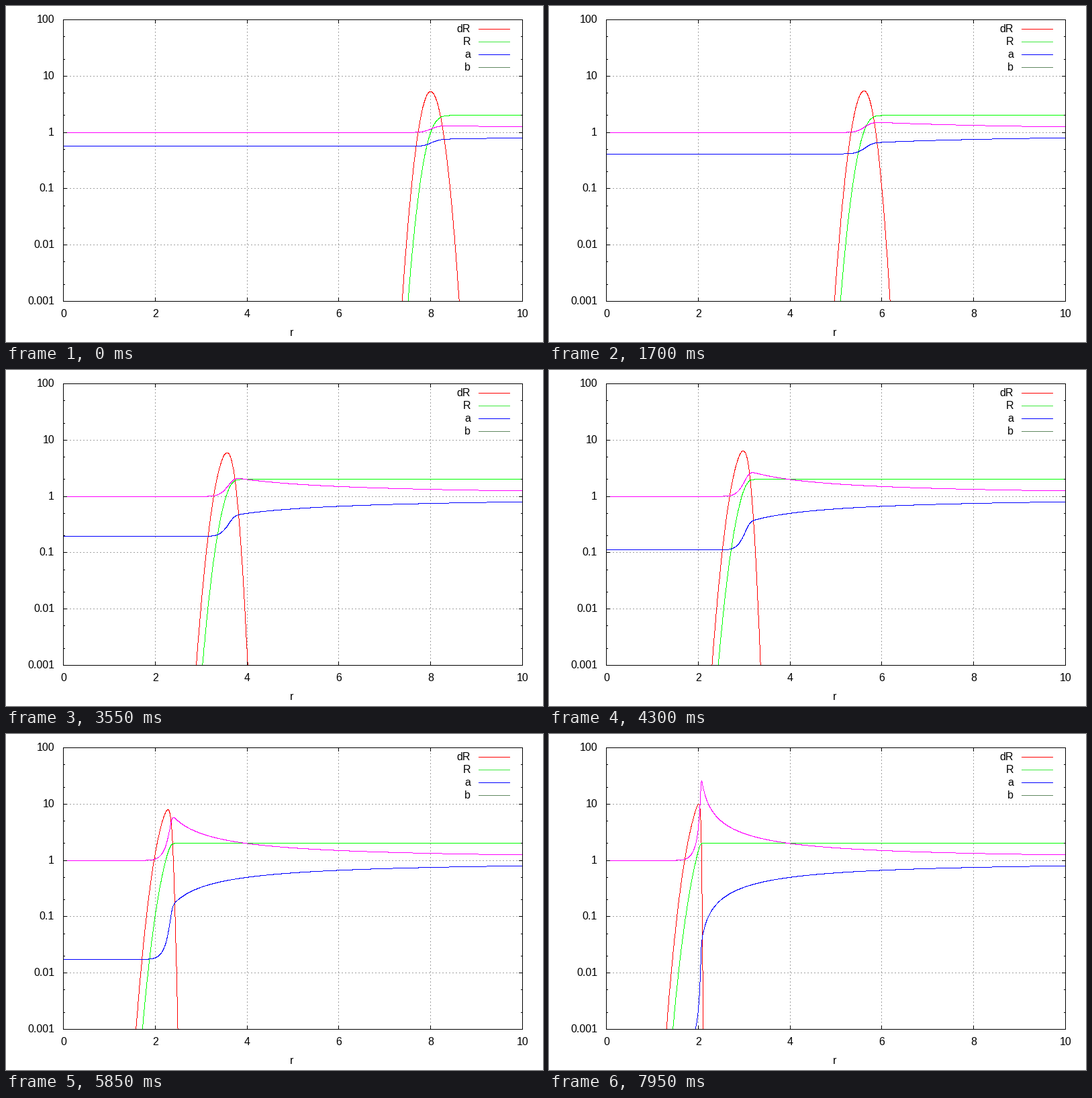
Recreate the animation shown at these times as a matplotlib script. Size 800x500 px, loop 8 s.

```python
import math

import numpy as np
import matplotlib.pyplot as plt
from matplotlib.animation import FuncAnimation

plt.rcParams["font.family"] = "Liberation Sans"

FRAMES, INTERVAL = 160, 50
WIDTH, HEIGHT = 800, 500
LEFT, RIGHT, TOP, BOTTOM = 85, 769, 20, 439

BLACK, GREY = (0, 0, 0), (160, 160, 160)
RED, GREEN, BLUE, MAGENTA = (255, 0, 0), (0, 255, 0), (0, 0, 255), (255, 0, 255)
KEY = [("dR", RED), ("R", (64, 232, 64)), ("a", BLUE), ("b", (96, 136, 96))]

STEP = 0.0025  # grid spacing and time step
STEPS_PER_FRAME = 40
CENTRE, SIGMA = 8.0, 0.15


def to_x(r):
    return np.rint(LEFT + (RIGHT - LEFT) * np.asarray(r) / 10).astype(int)


def to_y(v):
    decades = 2 - np.log10(np.maximum(v, 1e-7))
    return np.rint(TOP + (BOTTOM - TOP) / 5 * decades).astype(int)


# Collapsing null shell: R moves inwards at the local speed of light.
r = STEP * np.arange(1, 4001)
mid = (r[1:] + r[:-1]) / 2


def redshift(R):
    """Integral of dR / (r - R) from each radius outwards."""
    parts = np.diff(R) / (mid - (R[1:] + R[:-1]) / 2)
    return np.append(np.cumsum(parts[::-1])[::-1], 0)


def advance(R):
    R = R.copy()
    for _ in range(STEPS_PER_FRAME):
        speed = (1 - R / r) * np.exp(-redshift(R))
        R[:-1] += speed[:-1] * np.diff(R)  # upwind step
    return R


states = [np.array([1 + math.erf((s - CENTRE) / SIGMA / math.sqrt(2)) for s in r])]
while len(states) < FRAMES:
    states.append(advance(states[-1]))


def trace(img, xs, ys, color):
    """Plot a one pixel wide polyline inside the frame."""
    px, py = to_x(xs), to_y(ys)
    length = np.maximum(abs(np.diff(px)), abs(np.diff(py)))
    along = np.append(0, np.cumsum(length))
    at = np.arange(along[-1] + 1)
    x = np.rint(np.interp(at, along, px)).astype(int)
    y = np.rint(np.interp(at, along, py)).astype(int)
    inside = (x >= LEFT) & (x <= RIGHT) & (y >= TOP) & (y <= BOTTOM)
    img[y[inside], x[inside]] = color


def add_grid(img):
    across = np.arange(LEFT, RIGHT + 1)
    up = np.arange(BOTTOM, TOP - 1, -1)
    for k in range(-2, 2):
        img[to_y(10.0**k), across[np.arange(across.size) % 5 < 2]] = GREY
    for v in range(2, 10, 2):
        img[up[np.arange(up.size) % 5 < 2], to_x(v)] = GREY


def add_axes(img):
    def tick_y(v, size):
        y = to_y(v)
        img[y, LEFT:LEFT + size] = BLACK
        img[y, RIGHT + 1 - size:RIGHT + 1] = BLACK

    for k in range(-3, 2):
        tick_y(10.0**k, 6)
        tick_y(2 * 10.0**k, 3)
        tick_y(5 * 10.0**k, 3)
    for v in range(0, 11, 2):
        x = to_x(v)
        img[TOP:TOP + 6, x] = BLACK
        img[BOTTOM - 5:BOTTOM + 1, x] = BLACK
    img[[TOP, BOTTOM], LEFT:RIGHT + 1] = BLACK
    img[TOP:BOTTOM + 1, [LEFT, RIGHT]] = BLACK


base = np.full((HEIGHT, WIDTH, 3), 255, dtype=np.uint8)
add_grid(base)
for i, (_, color) in enumerate(KEY):
    base[34 + 19 * i, 704:751] = color


def render(n):
    img = base.copy()
    R = states[n]
    shift = redshift(R)
    trace(img, mid, np.diff(R) / STEP, RED)
    trace(img, r, R, GREEN)
    trace(img, r, (1 - R / r) * np.exp(-2 * shift), BLUE)
    trace(img, r, 1 / (1 - R / r), MAGENTA)
    add_axes(img)
    return img


fig = plt.figure(figsize=(8, 5), dpi=100, facecolor="white")
ax = fig.add_axes([0, 0, 1, 1])
ax.axis("off")
screen = ax.imshow(render(0), extent=(0, WIDTH, HEIGHT, 0),
                   interpolation="nearest", aspect="auto")
ax.set_xlim(0, WIDTH)
ax.set_ylim(HEIGHT, 0)


def label(x, y, s, ha):
    ax.text(x, y, s, ha=ha, va="baseline", fontsize=11.52, color="black")


for i, name in enumerate(["100", "10", "1", "0.1", "0.01", "0.001"]):
    label(72, to_y(10.0 ** (2 - i)) + 5, name, "right")
for v in range(0, 11, 2):
    label(to_x(v) + 0.5, 463, str(v), "center")
label(425.5, 491, "r", "center")
for i, (name, _) in enumerate(KEY):
    label(692, 39 + 19 * i, name, "right")


def draw(n):
    screen.set_data(render(n))
    return [screen]


anim = FuncAnimation(fig, draw, frames=FRAMES, interval=INTERVAL,
                     init_func=lambda: draw(0), repeat=True)
plt.show()
```
